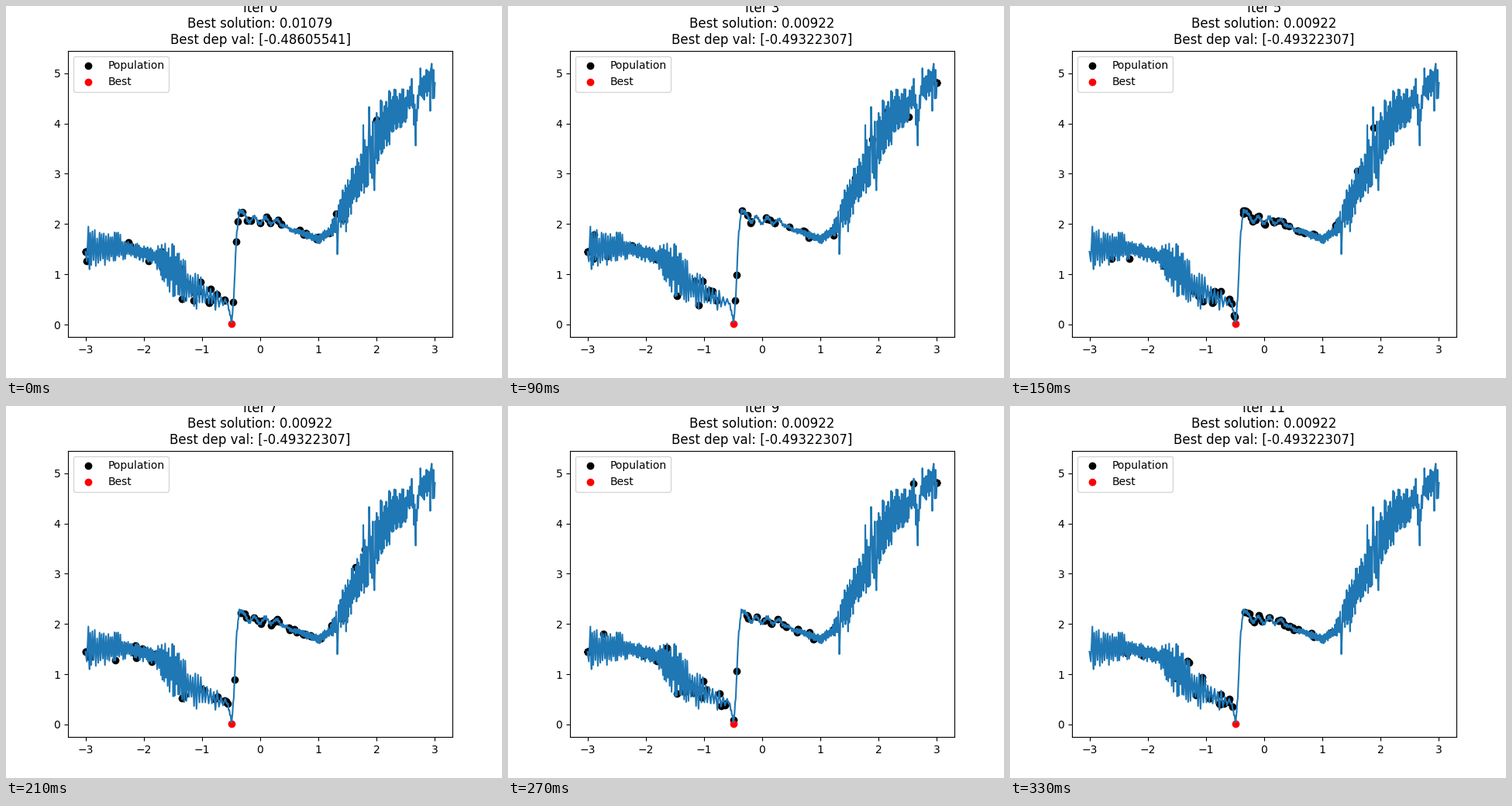
These frames come from a looping animation (640x480 px, 360 ms). A matplotlib script:

```python
import numpy as np
import matplotlib.pyplot as plt
from matplotlib.animation import FuncAnimation

FRAMES = 12
SIZE = 52
LIMIT = 3
TOP = 5.19

# key points (x, value) of the curve's middle, noise amplitude and zigzag spacing
MIDDLE = [(-3, 1.5), (-2.5, 1.57), (-1.75, 1.33), (-1.1, .66), (-.56, .43),
          (-.49, .04), (-.45, .6), (-.41, 1.75), (-.36, 2.27), (-.2, 2.09),
          (.3, 2.05), (.5, 1.9), (1, 1.7), (1.2, 1.85), (1.7, 2.9), (2, 3.65),
          (2.25, 4.15), (2.5, 4.35), (2.6, 4.65), (2.67, 4), (2.74, 4.75), (3, 4.8)]
AMPLITUDE = [(-3, .35), (-2.65, .38), (-2.2, .18), (-1.85, .16), (-1.65, .42),
             (-1.5, .53), (-1.1, .36), (-.7, .2), (-.57, .04), (.5, .04),
             (.95, .1), (1.2, .12), (1.4, .4), (2.05, .7), (2.55, .3), (3, .3)]
SPACING = [(-3, .02), (-1.9, .014), (-1.5, .015), (-1.1, .022), (-.6, .035),
           (-.55, .01), (-.3, .01), (0, .018), (1.3, .011), (3, .012)]

# outstanding peaks and dips
SPIKES = [(-3, 1.45), (-2.95, 1.95), (-2.93, 1.1), (-.49, .05), (1.325, 1.4),
          (1.475, 1.85), (1.77, 3.97), (1.87, 4.33), (1.96, 2.67), (2.215, 4.65),
          (2.67, 3.56), (2.75, 5.1), (2.92, 4.25), (2.945, TOP), (3, 4.81)]

# how far each generation scatters around the optimum
SPREAD = (1.1, .55, 1.3, 1.9, 1.4, 1, 1.2, 1.4, 1.5, 1.7, 1.3, 1)


def along(keys, x):
    return np.interp(x, *zip(*keys))


def middle(x):
    sway = .07 * np.cos(2 * np.pi * (x + .1) / .19) * np.exp(-(x / .35) ** 2)
    return along(MIDDLE, x) + sway


def build_curve():
    rng = np.random.default_rng(4)
    spike_x = np.array(SPIKES)[:, 0]
    points, x, sign = list(SPIKES), -LIMIT, 1
    while x < LIMIT:
        if np.abs(spike_x - x).min() > .006:
            swing = sign * rng.uniform(.4, 1) * along(AMPLITUDE, x)
            points.append((x, middle(x) + swing))
        sign = -sign
        x += along(SPACING, x) * rng.uniform(.8, 1.2)
    return np.array(sorted(points)).T


def generation(step):
    rng = np.random.default_rng(20 + step)
    x = np.clip(rng.normal(-.35, SPREAD[step], SIZE), -LIMIT, LIMIT)
    return np.column_stack([x, np.interp(x, *curve)])


curve = build_curve()

fig, ax = plt.subplots(figsize=(6.4, 4.8), dpi=100)
ax.plot(*curve)
population = ax.scatter([], [], color="black", label="Population")
best = ax.scatter([], [], color="red", label="Best")
ax.set_xlim(-1.1 * LIMIT, 1.1 * LIMIT)
ax.legend(loc="upper left")


def draw(step):
    x, y = (-.48605541, .01079) if step == 0 else (-.49322307, .00922)
    population.set_offsets(generation(step))
    best.set_offsets([(x, y)])
    margin = .05 * (TOP - y)
    ax.set_ylim(y - margin, TOP + margin)
    ax.set_title(f"Iter {step}\nBest solution: {y:.5f}\nBest dep val: [{x:.8f}]")
    return population, best


anim = FuncAnimation(fig, draw, frames=FRAMES, interval=30, repeat=True, repeat_delay=0)
plt.show()
```
